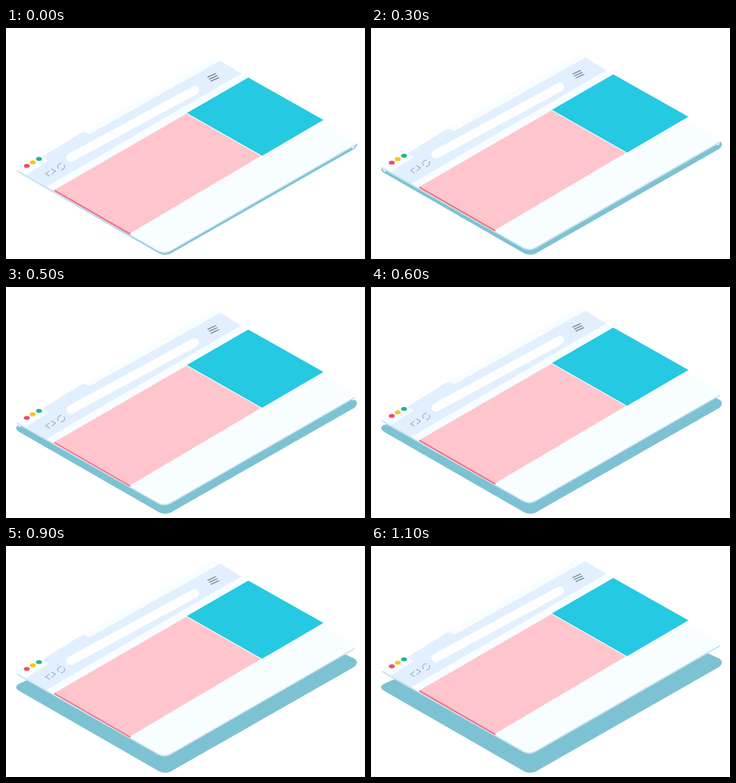
These frames come from a looping animation (449 px wide and 289 px high, 1200 ms). An HTML page:

```html
<!DOCTYPE html>
<html lang="en">
<head>
<meta charset="utf-8">
<title>Floating browser window</title>
<style>
  html, body { margin: 0; width: 100%; height: 100%; overflow: hidden; background: #fff; }
  svg { display: block; width: 100vw; height: 100vh; }
</style>
</head>
<body>
<svg viewBox="0 0 449 289" fill="none" stroke-linecap="round" stroke-linejoin="round">
  <path fill="#7dc2d3" d="M15 173 L262 60 L436 141 Q442 145 436 151 L208 281 Q199 286.5 190 281 L16 181 Q10 177 15 173Z"/>
  <g id="page">
    <!-- white rim keeps the shadow from showing above the page -->
    <path stroke="#fff" stroke-width="14" stroke-linecap="butt" d="M13 156 L262 15 L438 123"/>
    <path fill="#f8fdff" d="M13 156 L256 17 Q262 14 268 18 L436 121 Q439 123 436 125 L206 257 Q198 262 190 257 L14 158Z"/>
    <path fill="#e2effe" d="M25 162 L53 144 L46 139 L92 110 Q96 107 100 109 Q105 112 108 109 L268 19 L294 35 L50 177Z"/>
    <path stroke="#c3e0ee" stroke-width="1.5" d="M14 157 L190 257 Q198 261.5 206 257 L436 125"/>
    <path stroke="#fff" stroke-width="11" d="M81 140 L236 56"/>
    <path fill="#ffc5cc" d="M60 181 L226 85 L319 138 L155 235Z"/>
    <path stroke="#f4657b" stroke-width="1.6" d="M61 181.5 L155 235.5"/>
    <path fill="#25c9e1" d="M226 84.5 L303 40 L397 93 L320 138Z"/>
    <path stroke="#fff" d="M225.5 84.6 L319.5 138"/>
    <g stroke="#8f98a8" stroke-width=".9">
      <path d="M54 157 L49.5 160.5 L54.5 163.2 M57 154.5 L62 157 L57.5 160.7"/>
      <ellipse cx="69" cy="151.3" rx="4.4" ry="3.9" stroke-dasharray="9 4.1" stroke-dashoffset="3"/>
      <path stroke="#7c8796" stroke-width="1.3" d="M252.5 39.5 L262 35.2 M254.5 42 L264 37.7 M256.5 44.5 L266 40.2"/>
    </g>
    <ellipse fill="#ef4e69" cx="26" cy="150.5" rx="3.7" ry="2.5"/>
    <ellipse fill="#fcc419" cx="33.5" cy="146" rx="3.7" ry="2.5"/>
    <ellipse fill="#20b58d" cx="41.3" cy="141.8" rx="3.7" ry="2.5"/>
  </g>
</svg>
<script>
  const page = document.getElementById('page');
  const LOOP = 1200, STEP = 100, HEIGHT = 23.5, LOW = 22.2;
  const start = performance.now();

  // Eased lift in discrete steps, dropping back when the loop restarts
  function draw() {
    const elapsed = (performance.now() - start) % LOOP;
    const t = Math.floor(elapsed / STEP) * STEP;
    const rise = HEIGHT * (1 - Math.cos(Math.PI * (t + 90) / 1400)) / 2;
    page.setAttribute('transform', `translate(0 ${LOW - rise})`);
    requestAnimationFrame(draw);
  }
  draw();
</script>
</body>
</html>
```
